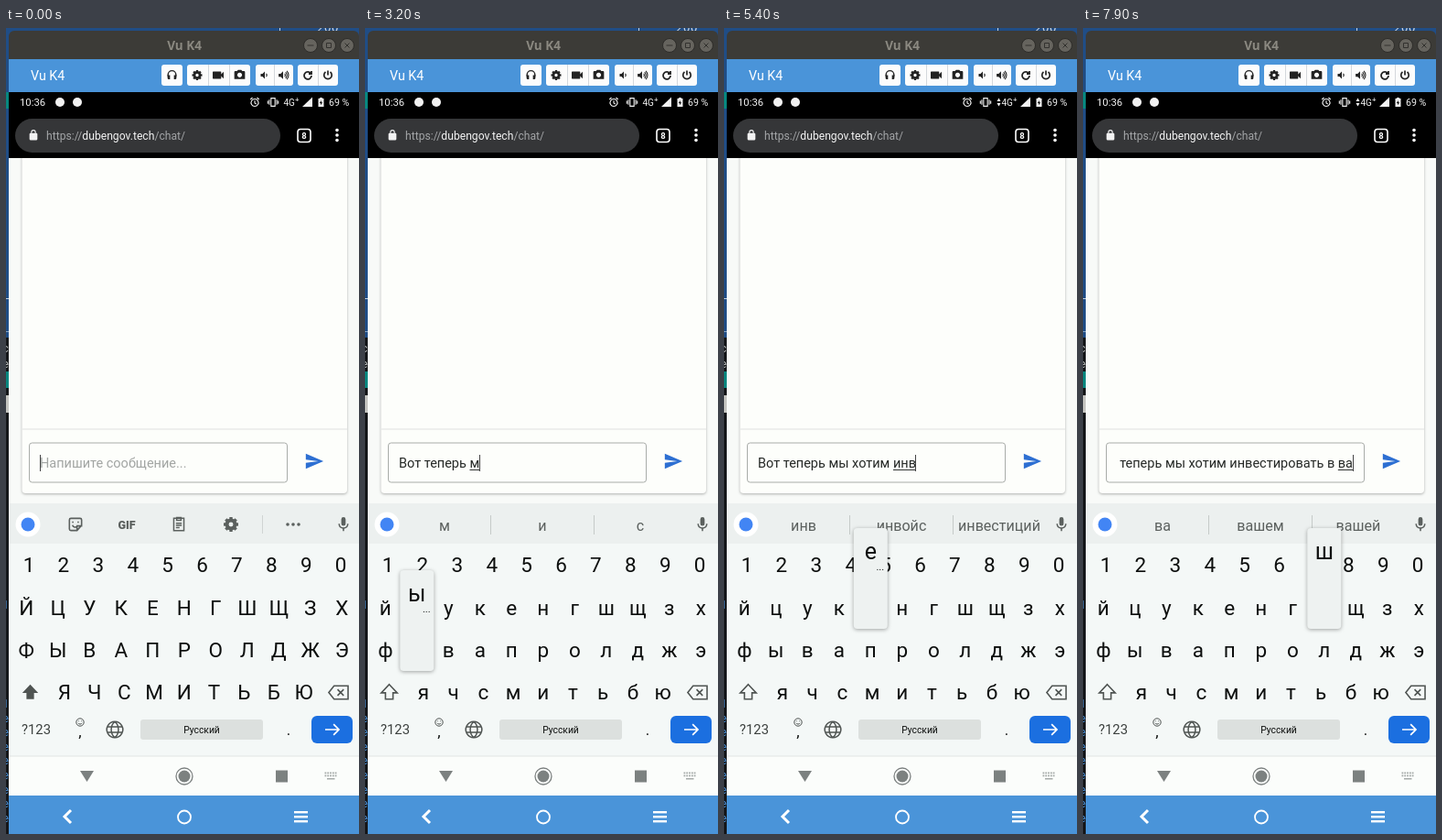
Write an HTML page with a canvas that moves like this. It is 386x880 px and loops after 8000 ms.

```html
<!DOCTYPE html>
<html lang="ru">
<head>
<meta charset="utf-8">
<title>Chat typing</title>
<style>
html, body { margin: 0; width: 100%; height: 100%; overflow: hidden; background: #000; }
canvas { display: block; width: 386px; height: 880px; }
</style>
</head>
<body>
<canvas id="stage" width="386" height="880"></canvas>
<script>
const ctx = document.getElementById('stage').getContext('2d');
const LOOP = 8000;
const SANS = 'Roboto, "Noto Sans", sans-serif';
const PLACEHOLDER = 'Напишите сообщение...';
const A = 'Вот ', B = A + 'теперь ', C = B + 'мы ', D = C + 'хотим ', E = D + 'инвестировать ';

// [start ms, typed text, pressed key, suggestions (kept if omitted)]
const STEPS = [
  [0, '', ''],
  [1000, '', 'В'],
  [1100, 'В', '', 'В|Я|С'],
  [1200, 'В', 'о'],
  [1300, 'Во', 'т', 'Во|Вот|Вы'],
  [1400, 'Вот', '', 'Вот|Арт|Во'],
  [1600, A, '', 'и|так|что'],
  [1900, A + 'т', 'е'],
  [2100, A + 'те', '', 'т|и|с'],
  [2200, A + 'те', '', 'те|тебя|тебе'],
  [2300, A + 'теп', 'е'],
  [2500, A + 'тепе', 'р', 'теп|теперь|тепло'],
  [2600, A + 'тепер', '', 'тепер|теперь|теперешний'],
  [2700, A + 'тепер', 'ь'],
  [2800, A + 'теперь', '', 'теперь|Теперь|теперешний'],
  [2900, A + 'теперь', ' '],
  [3000, B, '', 'я|и|все'],
  [3100, B + 'м', 'м'],
  [3200, B + 'м', 'ы', 'м|и|с'],
  [3400, B + 'мы', ''],
  [3500, B + 'мы', '', 'мы|мы с|мысль'],
  [3800, C, '', 'с|не|и'],
  [3900, C, 'х'],
  [4000, C + 'х', '', 'х|в|з'],
  [4100, C + 'х', 'о'],
  [4200, C + 'хо', 'т', 'хо|хотя|хорошо'],
  [4300, C + 'хот', '', 'хот|хотя|хоть'],
  [4400, C + 'хот', 'и'],
  [4500, C + 'хоти', '', 'хоти|хотим|хотите'],
  [4600, C + 'хоти', 'м'],
  [4700, C + 'хотим', ''],
  [4800, C + 'хотим', ' ', 'хотим|хотимся|Хотим'],
  [4900, D, '', 'чтобы|в|и'],
  [5000, D + 'и', 'н', 'и|в|с'],
  [5200, D + 'ин', 'в', 'ин|иначе|иногда'],
  [5400, D + 'инв', 'е', 'инв|инвойс|инвестиций'],
  [5500, D + 'инве', '', 'инве|инвентарь|инвестиций'],
  [5600, D + 'инве', 'с'],
  [5700, D + 'инвес', 'т', 'инвес|инвестиций|инвестор'],
  [5800, D + 'инвест', 'и', 'инвест|инвестиций|инвестор'],
  [5900, D + 'инвести', 'р', 'инвести|инвестиции|инвестиций'],
  [6000, D + 'инвестир', '', '|инвестировать|'],
  [6100, D + 'инвестир', 'о'],
  [6200, D + 'инвестиро', 'в'],
  [6400, D + 'инвестиров', 'а'],
  [6500, D + 'инвестирова', ''],
  [6700, D + 'инвестирова', 'т'],
  [6800, D + 'инвестироват', 'ь'],
  [7000, D + 'инвестировать', ' '],
  [7100, E, '', 'в|и|не'],
  [7200, E + 'в', ' ', 'в|с|и'],
  [7300, E + 'в ', '', 'этом|том|день'],
  [7500, E + 'в ', 'в'],
  [7600, E + 'в в', '', 'в|с|а'],
  [7700, E + 'в в', 'а'],
  [7800, E + 'в ва', '', 'ва|вашем|вашей'],
  [7900, E + 'в ва', 'ш']
];

const ROWS = [
  { keys: '1234567890', x: 25, dx: 37.9, y: 586 },
  { keys: 'йцукенгшщзх', x: 22.3, dx: 34.5, y: 633 },
  { keys: 'фывапролджэ', x: 22.3, dx: 34.5, y: 679 },
  { keys: 'ячсмитьбю', x: 64, dx: 32.7, y: 725 }
];

const ICON = {
  video: 'M17 10.5V7a1 1 0 0 0-1-1H4a1 1 0 0 0-1 1v10a1 1 0 0 0 1 1h12a1 1 0 0 0 1-1v-3.5l4 4v-11z',
  camera: 'M9 3L7 5H4a2 2 0 0 0-2 2v13h20V7a2 2 0 0 0-2-2h-3l-2-2zM12 8a4.5 4.5 0 1 0 .01 0z',
  speaker: 'M3 9v6h4l5 5V4L7 9z',
  wave1: 'M15 9a4 4 0 0 1 0 6',
  wave2: 'M15 9a4 4 0 0 1 0 6M17 6a8 8 0 0 1 0 12M19.5 3.5a12 12 0 0 1 0 17',
  band: 'M4 15V12a8 8 0 0 1 16 0v3',
  pads: 'M3 13h5v8H5a2 2 0 0 1-2-2zM16 13h5v6a2 2 0 0 1-2 2h-3z',
  reload: 'M18.5 8A8 8 0 1 0 20 13M20 3v6h-6',
  power: 'M12 2v10M7 5a8.5 8.5 0 1 0 10 0',
  lock: 'M18 8h-1V6A5 5 0 0 0 7 6v2H6a2 2 0 0 0-2 2v10a2 2 0 0 0 2 2h12a2 2 0 0 0 2-2V10a2 2 0 0 0-2-2zM15 8H9V6a3 3 0 0 1 6 0z',
  alarm: 'M12 5a8 8 0 1 0 .01 0zM12 8.5V14l3.5 2M2.5 6L7 2M21.5 6L17 2',
  vibrate: 'M8 4h8v16H8zM4.5 7v10M19.5 7v10M1.5 9v6M22.5 9v6',
  battery: 'M9 2h6v2h3v18H6V4h3zM12.7 8l-4 6h2.5v4.5l4-6h-2.5z',
  send: 'M2 21L23 12 2 3v7l15 2-15 2z',
  mic: 'M12 14a3 3 0 0 0 3-3V5a3 3 0 0 0-6 0v6a3 3 0 0 0 3 3zM17 11a5 5 0 0 1-10 0H5a7 7 0 0 0 6 6.9V21h2v-3.1A7 7 0 0 0 19 11z',
  shift: 'M12 3L21.5 13H16.5V20.5H7.5V13H2.5Z',
  erase: 'M7 4.5H23V19.5H7L1 12ZM11 8.5l7 7M18 8.5l-7 7',
  globe: 'M12 2a10 10 0 1 0 .01 0zM12 2c-6 5-6 15 0 20c6-5 6-15 0-20M3 8.5h18M3 15.5h18',
  smile: 'M12 2a10 10 0 1 0 .01 0zM7 14c2 4 8 4 10 0M8 8v2M16 8v2',
  sticker: 'M20 13V6a2 2 0 0 0-2-2H6a2 2 0 0 0-2 2v12a2 2 0 0 0 2 2h8zv1h-6v6M8 13c1 3 4 3 6 2M8.5 8v2M15.5 8v2',
  clip: 'M5 4h14v17H5zM9 3h6v4H9zM8 11h8M8 14h8M8 17h5',
  enter: 'M3 12h18M14 5l7 7-7 7'
};

function rect(x, y, w, h, fill, r = 0, stroke, line = 1) {
  ctx.beginPath();
  ctx.roundRect(x, y, w, h, r);
  if (fill) { ctx.fillStyle = fill; ctx.fill(); }
  if (stroke) { ctx.strokeStyle = stroke; ctx.lineWidth = line; ctx.stroke(); }
}

function disc(x, y, r, fill, stroke, w = 1) {
  ctx.beginPath();
  ctx.arc(x, y, r, 0, Math.PI * 2);
  if (fill) { ctx.fillStyle = fill; ctx.fill(); }
  if (stroke) { ctx.strokeStyle = stroke; ctx.lineWidth = w; ctx.stroke(); }
}

function poly(points, fill, stroke, w = 1) {
  ctx.beginPath();
  points.forEach(([x, y]) => ctx.lineTo(x, y));
  if (fill) { ctx.fillStyle = fill; ctx.fill(); }
  if (stroke) { ctx.strokeStyle = stroke; ctx.lineWidth = w; ctx.stroke(); }
}

function text(str, x, y, size, color, align = 'center', weight = 400, family = SANS) {
  ctx.font = `${weight} ${size}px ${family}`;
  ctx.textAlign = align;
  ctx.fillStyle = color;
  ctx.fillText(str, x, y);
  return ctx.measureText(str).width;
}

// Icons live in a 24-unit box; a line width switches from fill to stroke.
function icon(name, x, y, size, color, line) {
  const path = new Path2D(ICON[name]), k = size / 24;
  ctx.save();
  ctx.translate(x - size / 2, y - size / 2);
  ctx.scale(k, k);
  if (line) {
    ctx.strokeStyle = color;
    ctx.lineWidth = line / k;
    ctx.stroke(path);
  } else {
    ctx.fillStyle = color;
    ctx.fill(path, 'evenodd');
  }
  ctx.restore();
}

function gear(x, y, r, color) {
  disc(x, y, r * 0.56, null, color, r * 0.5);
  for (let i = 0; i < 8; i++) {
    const a = i * Math.PI / 4, c = Math.cos(a), s = Math.sin(a);
    poly([[x + c * r * 0.7, y + s * r * 0.7], [x + c * r, y + s * r]], null, color, r * 0.42);
  }
}

function desktop() {
  rect(0, 0, 386, 880, '#204d86');
  rect(0, 70, 3, 18, '#07877f');
  rect(0, 295, 3, 1, '#c6d2e0');
  rect(0, 331, 3, 1, '#8ba6c4');
  rect(0, 338, 3, 542, '#15171a');
  rect(0, 375, 3, 18, '#07877f');
  rect(0, 401, 3, 19, '#c4c4c0');
  text('c', -4, 354, 13, '#b9bcbc', 'left');
  text('e', -4, 371, 13, '#b9bcbc', 'left');
  text('1', -4, 634, 13, '#4b8fd4', 'left');
  for (let i = 0; i < 9; i++) text(i ? 'e' : '1', -4, 742 + i * 15.6, 13, '#4b8fd4', 'left');
  rect(299, 0, 1, 4, '#c6d2e0');
  text('200', 340, 4, 13, '#c6d2e0', 'left', 400, '"DejaVu Sans Mono", monospace');
}

function windowBar() {
  rect(3, 3, 383, 32, '#3c3b37', [6, 6, 0, 0]);
  text('Vu K4', 195, 24, 13.5, '#8b8981', 'center', 700, '"Open Sans", sans-serif');
  [333, 353, 373].forEach(x => disc(x, 19, 7.5, '#66645e', '#2e2d2a'));
  rect(329.5, 18.5, 7, 1, '#32312e');
  rect(350.5, 16.5, 5, 5, null, 0, '#32312e');
  poly([[370.5, 16.5], [375.5, 21.5]], null, '#32312e');
  poly([[375.5, 16.5], [370.5, 21.5]], null, '#32312e');

  rect(3, 34, 383, 36, '#4a94d9');
  text('Vu K4', 27, 57, 14.3, '#fff', 'left');
  const ink = '#222';
  [[170, 23], [198, 69], [273, 41], [319, 44]].forEach(([x, w]) => rect(x, 40, w, 23, '#fcfcfc', 3));
  [221, 244, 293, 341].forEach(x => rect(x, 40, 1, 23, '#d4d8dc'));
  icon('band', 181.5, 51, 13, ink, 1.4);
  icon('pads', 181.5, 51, 13, ink);
  gear(209, 51.5, 5.5, ink);
  icon('video', 232, 51.5, 16, ink);
  icon('camera', 255.5, 51, 14, ink);
  icon('speaker', 283, 51.5, 12, ink);
  icon('wave1', 283, 51.5, 12, ink, 1.1);
  icon('speaker', 303, 51.5, 13, ink);
  icon('wave2', 303, 51.5, 13, ink, 1.1);
  icon('reload', 330, 51.5, 12, ink, 1.8);
  icon('power', 352, 51.5, 12, ink, 1.7);
}

function browserBar(data) {
  rect(3, 70, 383, 72, '#000');
  const w = '#f2f2f2', shift = data ? -6 : 0;
  text('10:36', 15, 85, 11.3, w, 'left');
  disc(59, 81, 5, w);
  disc(78, 81, 5, w);
  icon('alarm', 272 + shift, 81, 12, w, 1.1);
  icon('vibrate', 292 + shift, 81, 13, w, 1.1);
  if (data) {
    poly([[298.5, 80], [300.5, 76.5], [302.5, 80]], w);
    poly([[298.5, 82], [300.5, 85.5], [302.5, 82]], w);
  }
  text('4G', 303.5, 85, 10, w, 'left');
  text('+', 316, 81, 8, w, 'left');
  poly([[324, 86], [335, 86], [335, 75.5]], w);
  icon('battery', 344.5, 81, 12, w);
  text('69 %', 353, 85, 10.6, w, 'left');

  rect(10, 99, 290, 37, '#353638', 18.5);
  icon('lock', 30, 117, 13, w);
  let x = 44;
  [['https://', '#a3a5a7'], ['dubengov.tech', '#f4f4f4'], ['/chat/', '#a3a5a7']].forEach(([s, c]) => {
    x += text(s, x, 122, 12.15, c, 'left');
  });
  rect(319, 110.5, 14, 14, null, 3, '#fff', 1.6);
  text('8', 326, 121, 9.5, '#fff', 'center', 700);
  [111.5, 117, 122.5].forEach(y => disc(362, y, 1.8, '#fff'));
}

function chatField(typed, caretOn) {
  rect(3, 142, 383, 378, '#f8faf8');
  ctx.save();
  ctx.shadowColor = 'rgba(0,0,0,.3)';
  ctx.shadowBlur = 3;
  ctx.shadowOffsetY = 1;
  ctx.beginPath();
  ctx.rect(3, 142, 383, 378);
  ctx.clip();
  rect(17.5, 130, 355.5, 378, '#fdfefb', 4);
  ctx.restore();
  rect(18, 437.5, 355, 1, '#dfe2df');
  rect(25.5, 453, 282, 43, '#fdfefb', 3, '#a9aca9');
  icon('send', 337, 473, 22, '#2d6fd2');

  const left = 37, base = 480, size = 14.5;
  ctx.save();
  ctx.beginPath();
  ctx.rect(left, 460, 259, 30);
  ctx.clip();
  ctx.font = `400 ${size}px ${SANS}`;
  const width = ctx.measureText(typed).width;
  const x = left - Math.max(0, width - 258);
  if (!typed) {
    text(PLACEHOLDER, left, base, size, '#a2a5a3', 'left');
  } else {
    text(typed, x, base, size, '#252826', 'left');
    const word = x + ctx.measureText(typed.slice(0, typed.lastIndexOf(' ') + 1)).width;
    rect(word, 482, x + width - word, 1, '#333634');
  }
  if (caretOn) rect(Math.floor(x + width), 466, 1, 18, '#444');
  ctx.restore();
}

function strip(typed, words) {
  const ink = '#5b605e';
  rect(3, 519, 383, 44, '#ecf0ef');
  disc(24, 542, 13.5, '#fff');
  disc(24, 542, 7.5, '#4285f4');
  icon('mic', 369, 542, 19, ink);
  if (!typed) {
    icon('sticker', 76, 542, 20, ink, 1.6);
    text('GIF', 132, 546.5, 12.5, ink, 'center', 900);
    icon('clip', 189, 541.5, 19, ink, 1.5);
    gear(246, 542, 8, ink);
    rect(280, 532, 1, 20, '#d0d4d3');
    [308, 314, 320].forEach(x => disc(x, 542, 1.8, ink));
    return;
  }
  const list = words.split('|');
  list.forEach((word, i) => text(word, 87 + 107 * i, 549, 16.1, ink));
  if (list[0]) [137, 250].forEach(x => rect(x, 532, 1, 21, '#c5cac8'));
}

function keyboard(caps, spaceDown) {
  const ink = '#0d0f0e', soft = '#4f5452';
  rect(3, 563, 383, 232, '#f4f8f7');
  ROWS.forEach(({ keys, x, dx, y }) => [...keys].forEach((key, i) =>
    text(caps ? key.toUpperCase() : key, x + i * dx, y + 7.8, 22.5, ink)));
  icon('shift', 26.5, 725, 22, soft, caps ? 0 : 1.6);
  icon('erase', 363.5, 725.5, 23, soft, 1.6);
  text('?123', 33, 771, 14.8, '#3c413f');
  icon('smile', 81, 758, 10, soft, 1);
  text(',', 81, 774, 17, ink);
  icon('globe', 119, 766, 21, soft, 1.5);
  rect(147, 755, 134, 22, spaceDown ? '#a9adab' : '#dce0de', 3);
  text('Русский', 214, 770, 10.3, ink);
  text('.', 309, 772, 17, ink);
  rect(334, 751, 45, 30, '#1b6fe0', 6);
  icon('enter', 356.5, 766, 20, '#fff', 1.7);
}

function popup(key) {
  const low = key.toLowerCase();
  const row = ROWS.find(r => r.keys.includes(low));
  const x = row.x + row.dx * row.keys.indexOf(low);
  ctx.save();
  ctx.shadowColor = 'rgba(0,0,0,.35)';
  ctx.shadowBlur = 4;
  ctx.shadowOffsetY = 1;
  rect(x - 18.5, row.y - 87, 37, 110, '#eef2f1', 4);
  ctx.restore();
  text(key, x, row.y - 52.8, 25, '#0d0f0e');
  if ('еыь'.includes(low)) text('...', x + 10.5, row.y - 41, 11, '#0d0f0e');
}

function navBars() {
  const gray = '#7c8180';
  rect(3, 795, 383, 44, '#fbfdfb');
  rect(3, 794.5, 383, 1, '#e2e6e4');
  poly([[81, 811], [96, 811], [88.5, 823]], gray);
  disc(195, 817, 9, null, gray, 1.3);
  disc(195, 817, 6.5, gray);
  rect(295, 810.5, 13, 13, gray);
  for (let i = 0; i < 10; i++) rect(348.5 + (i % 5) * 2.8, 812.5 + Math.floor(i / 5) * 3, 1.8, 1.8, '#a5aaa8');
  rect(351, 819, 8.5, 1.5, '#a5aaa8');

  rect(3, 838, 383, 42, '#4a94d9');
  poly([[71, 854], [64, 861], [71, 868]], null, '#fff', 3);
  disc(195, 861.5, 7, null, '#fff', 1.8);
  [855, 860, 865].forEach(y => rect(315, y, 15, 2.4, '#fff'));
}

function draw(t) {
  let typed, key, words = '';
  for (const [at, str, pressed, list] of STEPS) {
    if (at > t) break;
    typed = str;
    key = pressed;
    if (list !== undefined) words = list;
  }
  const data = (t >= 2100 && t < 2700) || t >= 4000;
  desktop();
  windowBar();
  chatField(typed, t < 100 || t >= 500);
  browserBar(data);
  strip(typed, words);
  keyboard(!typed, key === ' ');
  if (key && key !== ' ') popup(key);
  navBars();
}

const start = performance.now();
function tick() {
  draw((performance.now() - start) % LOOP);
  requestAnimationFrame(tick);
}
tick();
</script>
</body>
</html>
```
